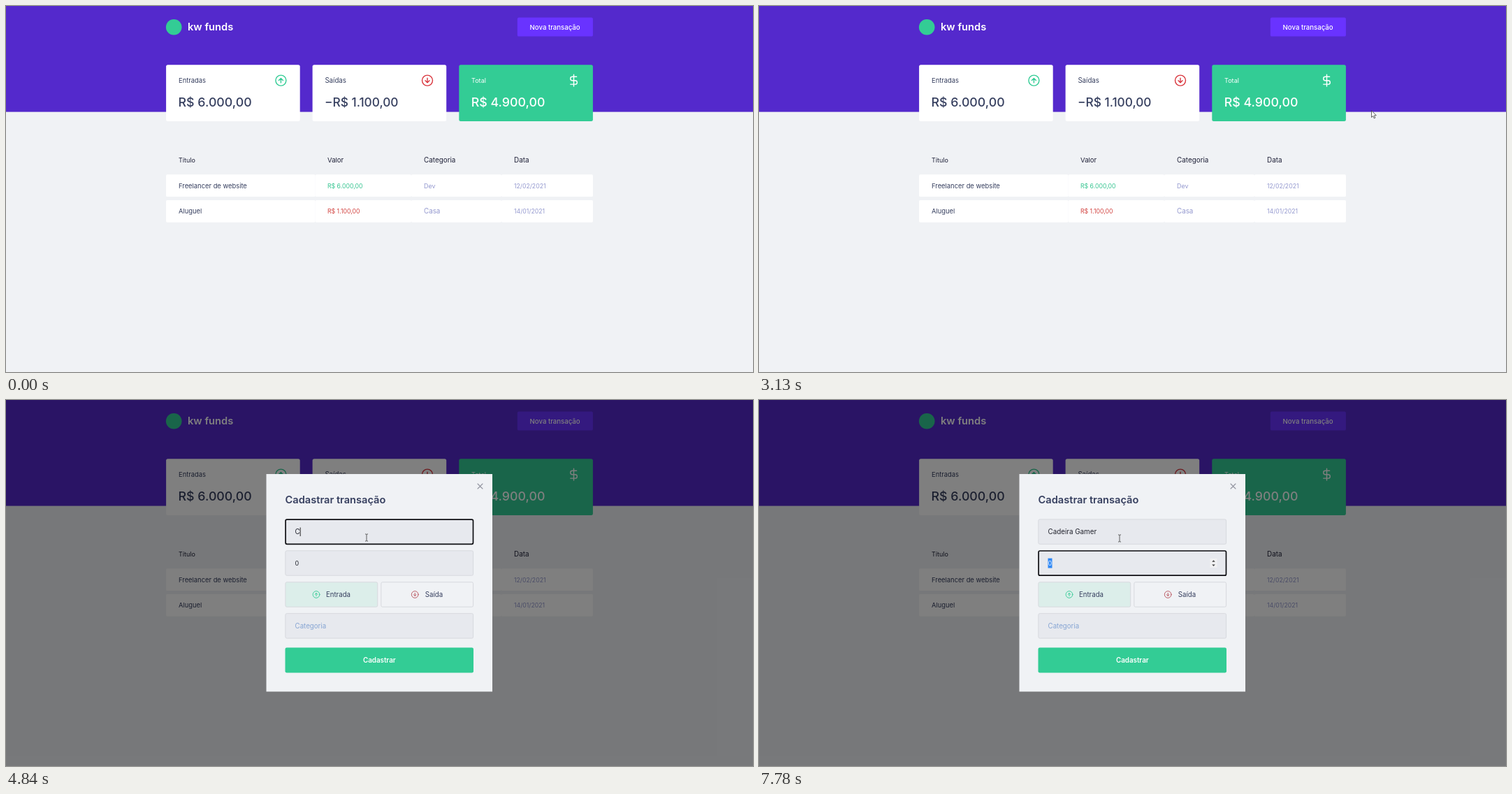
These frames come from a looping animation (1069x524 px, 8 s). An HTML page:

```html
<!DOCTYPE html>
<html lang="pt-BR">
<head>
<meta charset="utf-8">
<title>Nova transação</title>
<style>
html, body { margin: 0; width: 100%; height: 100%; overflow: hidden; background: #f0f2f5; }
svg { display: block; width: 100%; height: 100%; }
text { font: 9.4px Inter, sans-serif; fill: #363f5f; white-space: pre; }
.big { font-size: 17.8px; font-weight: 500; }
.head text { fill: #1f2138; }
.num { font-size: 8.7px; }
.soft { fill: #9499cf; }
.hint { fill: #86a5d3; font-size: 9.7px; }
.white { fill: #fff; }
.field { fill: #e7e9ee; stroke: #d7d9de; }
.icon { fill: none; stroke-linecap: round; stroke-linejoin: round; }
.green { stroke: #33cc95; }
.red { stroke: #d9363e; }
</style>
</head>
<body>
<svg viewBox="0 0 1069 524" preserveAspectRatio="none">
  <defs>
    <g id="up" class="icon" stroke-width="1.4"><circle r="7.5"/><path d="M0 3.3V-3.1M-3 -.1L0 -3.1L3 -.1"/></g>
    <g id="down" class="icon" stroke-width="1.4"><circle r="7.5"/><path d="M0 -3.3V3.1M-3 .1L0 3.1L3 .1"/></g>
  </defs>

  <rect width="1069" height="524" fill="#f0f2f5"/>
  <rect width="1069" height="151.6" fill="#5429cc"/>
  <circle cx="240.2" cy="30.2" r="11.3" fill="#33cc95"/>
  <text x="260" y="35" class="white" style="font-size:14.7px;font-weight:600">kw funds</text>
  <g id="button">
    <rect x="731.8" y="16.6" width="108.1" height="27" rx="2.2" fill="#6933ff"/>
    <text x="749.6" y="33.8" class="white" style="font-size:9.6px;font-weight:500">Nova transação</text>
  </g>

  <g fill="#fff">
    <rect x="229.1" y="84.2" width="191.6" height="80.9" rx="2.5"/>
    <rect x="438.6" y="84.2" width="191.6" height="80.9" rx="2.5"/>
    <rect x="648.3" y="84.2" width="191.6" height="80.9" rx="2.5" fill="#33cc95"/>
  </g>
  <text x="247" y="110">Entradas</text>
  <text x="456.4" y="110" style="font-size:9.7px">Saídas</text>
  <text x="666" y="110" class="white" style="font-size:9.1px">Total</text>
  <text x="246.6" y="144.3" class="big">R$ 6.000,00</text>
  <text x="456" y="144.3" class="big" style="font-size:17.3px">−R$ 1.100,00</text>
  <text x="665.8" y="144.3" class="big white">R$ 4.900,00</text>
  <use href="#up" x="393.4" y="106.6" class="green"/>
  <use href="#down" x="603" y="106.6" class="red"/>
  <path class="icon" stroke="#fff" stroke-width="1.4" d="M812.5 98.2V115M816.6 101.3H810.4a2.7 2.7 0 0 0 0 5.4H814.6a2.7 2.7 0 0 1 0 5.4H807.7"/>

  <g class="head">
    <text x="247" y="224" style="font-size:9px">Título</text>
    <text x="460" y="224" style="font-size:9.6px">Valor</text>
    <text x="598" y="224" style="font-size:9.9px">Categoria</text>
    <text x="727" y="224" style="font-size:9.9px">Data</text>
  </g>
  <g id="cells" fill="#fff"></g>
  <text x="247" y="260.5">Freelancer de website</text>
  <text x="460" y="260.5" class="num" style="fill:#33c48f">R$ 6.000,00</text>
  <text x="598" y="260.5" class="soft" style="font-size:9px">Dev</text>
  <text x="727" y="260.5" class="num soft">12/02/2021</text>
  <text x="247" y="297">Aluguel</text>
  <text x="460" y="297" class="num" style="fill:#d2423f">R$ 1.100,00</text>
  <text x="598" y="297" class="soft" style="font-size:9.8px">Casa</text>
  <text x="727" y="297" class="num soft">14/01/2021</text>

  <g id="modal">
    <rect width="1069" height="524" fill="#000" fill-opacity=".5"/>
    <rect x="372.5" y="106" width="323.5" height="311.5" fill="#f0f2f5"/>
    <path id="close" class="icon" stroke="#92949f" stroke-width="1.1" d="M675 120l7 7M682 120l-7 7"/>
    <text x="399.6" y="147.6" style="font-size:14.6px;font-weight:600">Cadastrar transação</text>
    <g class="field">
      <rect x="399.9" y="170.9" width="268.7" height="35.4" rx="2"/>
      <rect x="399.9" y="215.8" width="268.7" height="35.4" rx="2"/>
      <rect x="399.9" y="260.8" width="131.8" height="35.4" rx="2" style="fill:#dceeea"/>
      <rect x="536.8" y="260.8" width="131.8" height="35.4" rx="2" style="fill:#f0f2f5"/>
      <rect x="399.9" y="305.7" width="268.7" height="35.4" rx="2"/>
    </g>
    <rect id="focus" x="400.1" width="268.4" height="35.2" rx="2" fill="none" stroke="#101014" stroke-width="1.7"/>
    <text id="hint" x="413.6" y="192.2" class="hint" style="font-size:9.1px">Título</text>
    <text id="typed" x="413.6" y="192.2" style="font-size:9.8px;fill:#22242e"></text>
    <path id="caret" d="M0 182.5V195" stroke="#111" stroke-width=".9"/>
    <rect id="selected" x="413.5" y="226.6" width="6" height="14" fill="#2f88f5"/>
    <text id="zero" x="413.6" y="236.9" style="font-size:9px">0</text>
    <g id="spin">
      <rect x="645.5" y="227" width="10" height="13" fill="#f1f1f2"/>
      <path d="M648.2 231.7l2.3-2.5 2.3 2.5zM648.2 235.5l2.3 2.5 2.3-2.5z" fill="#444"/>
    </g>
    <use href="#up" class="green" transform="translate(444 278.5) scale(.65)"/>
    <use href="#down" stroke="#b8505a" transform="translate(585.2 278.5) scale(.65)"/>
    <text x="458" y="282" style="font-size:9.65px">Entrada</text>
    <text x="599.8" y="282" style="font-size:9.7px">Saída</text>
    <text x="413.6" y="326.8" class="hint">Categoria</text>
    <rect x="399.5" y="354.6" width="269.5" height="35.8" rx="2.2" fill="#33cc95"/>
    <text x="534.3" y="376" text-anchor="middle" class="white" style="font-size:9.8px;font-weight:600">Cadastrar</text>
  </g>

  <g id="pointer">
    <circle id="click" r="7" fill="#f0dc00" fill-opacity=".55"/>
    <path id="arrow" fill="#fff" stroke="#222" stroke-width=".7" d="M0 0V9.6L2.2 7.6L3.7 11L5.3 10.3L3.8 7L6.7 6.8Z"/>
    <path id="hand" fill="#fff" stroke="#333" stroke-width=".5" d="M-.3 1.5a1 1 0 0 1 2 0V5.2L5.8 6.2Q6.9 6.6 6.8 7.9L5.8 12.8H.5L-2.1 9Q-2 7.8 -1 8.1L-.3 8.8Z"/>
    <path id="beam" fill="none" stroke="#4a4a4a" stroke-width=".9" d="M0 -4.6V4.6M-2 -5.1Q0 -5.1 0 -4.4Q0 -5.1 2 -5.1M-2 5.1Q0 5.1 0 4.4Q0 5.1 2 5.1"/>
  </g>
</svg>
<script>
const $ = id => document.getElementById(id);
const show = (id, on) => $(id).setAttribute('display', on ? 'inline' : 'none');
const LOOP = 8000, OPEN = 4060, FOCUS = 4600, TAB = 7320;

const edges = [229.1, 442.7, 580, 709, 839.9];
for (const y of [241.3, 278])
  for (let i = 0; i < 4; i++)
    $('cells').innerHTML += `<rect x="${edges[i]}" y="${y}" width="${edges[i + 1] - edges[i]}" height="31.7" rx="1.6"/>`;

// pointer stops: time, x, y
const path = [
  [70, 960, 5], [240, 1035, 260], [400, 985, 504], [600, 860, 290], [720, 803, 128], [860, 826, 57],
  [1000, 805, 38], [1200, 775, 36], [1410, 788, 57], [1560, 780, 59], [1640, 757.5, 64],
  [1800, 622, 110], [1930, 720, 157], [2090, 901, 42], [2270, 876.7, 150],
  [3130, 876.7, 150], [3400, 838, 100], [3700, 788, 46], [3920, 776.7, 33.6],
  [4120, 776.7, 33.6], [4280, 650, 105], [4480, 516, 197], [7730, 516, 197], [7780, 516, 198]
];

const word = 'Cadeira Gamer';
const keys = [4840, 5240, 5380, 5520, 5730, 5840, 5950, 6070, 6330, 6660, 6860, 7060, 7130];

function pointerAt(t) {
  const i = path.findIndex(p => p[0] > t);
  if (i < 0) return path[path.length - 1].slice(1);
  if (i === 0) return path[0].slice(1);
  const [t0, x0, y0] = path[i - 1], [t1, x1, y1] = path[i];
  const k = (t - t0) / (t1 - t0);
  return [x0 + (x1 - x0) * k, y0 + (y1 - y0) * k];
}

function draw(t) {
  const [x, y] = pointerAt(t);
  const open = t >= OPEN, onValue = t >= TAB;
  const hover = t < 4120 && x > 732 && x < 840 && y > 16 && y < 44;
  const hand = hover && !open, beam = open && y > 170;

  $('button').style.filter = hover ? 'brightness(.9)' : 'none';
  show('modal', open);
  show('close', t >= 4120);

  show('pointer', t >= 70);
  $('pointer').setAttribute('transform', `translate(${x} ${y})`);
  show('click', (t >= 3980 && !open) || (t >= 4580 && t < 4700));
  show('arrow', !hand && !beam);
  show('hand', hand);
  show('beam', beam);

  const count = keys.filter(k => k <= t).length;
  $('typed').textContent = word.slice(0, count);
  show('hint', count === 0);
  show('focus', t >= FOCUS);
  $('focus').setAttribute('y', onValue ? 216 : 171.1);
  show('caret', t >= FOCUS && !onValue);
  if (open) {
    const end = count ? $('typed').getComputedTextLength() : 0;
    $('caret').setAttribute('transform', `translate(${414 + end} 0)`);
  }
  show('selected', onValue);
  show('spin', onValue);
  $('zero').style.fill = onValue ? '#e8f2ff' : '#22242e';
}

const start = performance.now();
function tick() {
  draw((performance.now() - start) % LOOP);
  requestAnimationFrame(tick);
}
tick();
</script>
</body>
</html>
```
